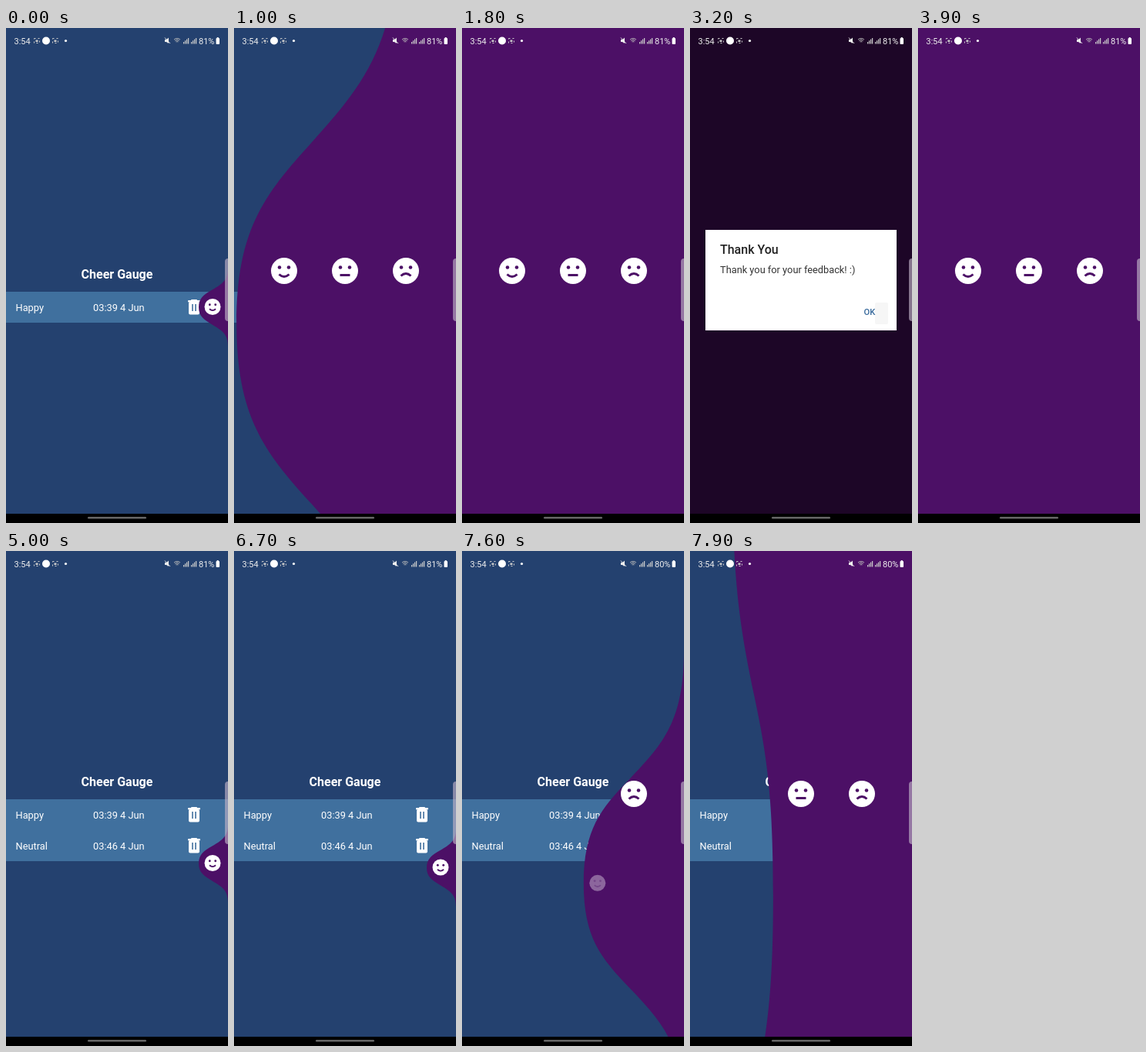
These frames come from a looping animation (288x640 px, 8 s). An HTML page with a canvas:

```html
<!DOCTYPE html>
<html lang="en">
<head>
<meta charset="utf-8">
<style>
  html, body { margin: 0; width: 100%; height: 100%; overflow: hidden; background: #000; }
  canvas { display: block; width: 288px; height: 640px; }
</style>
</head>
<body>
<canvas id="stage" width="288" height="640"></canvas>
<script>
const W = 288, H = 640, LOOP = 8000;
const BLUE = '#24416f', ROW = '#40709e', PURPLE = '#4c1066', WHITE = '#fff';
const ctx = document.getElementById('stage').getContext('2d');

// Piecewise linear value from [time, value] pairs
function track(keys, t) {
  for (let i = 1; i < keys.length; i++) {
    const [t0, a] = keys[i - 1], [t1, b] = keys[i];
    if (t < t1) return a + (b - a) * Math.max(0, (t - t0) / (t1 - t0));
  }
  return keys[keys.length - 1][1];
}

const swipeKeys = [[500, 0], [900, .19], [1200, .685], [1400, 1], [4200, 1], [4500, .86],
  [4900, .21], [5000, 0], [7200, 0], [7600, .19], [7900, .685], [8000, .85]];
const centerKeys = [[0, 361], [500, 361], [1200, 390], [4200, 380], [5000, 404],
  [5300, 409.5], [7200, 409.5], [7900, 445]];
const dialogKeys = [[2350, 0], [2550, 1], [3300, 1], [3500, 0]];
const pressKeys = [[2100, 1], [2200, .3], [2300, .3], [2450, 1]];

function rect(x, y, w, h, color, r = 0) {
  ctx.fillStyle = color;
  ctx.beginPath();
  ctx.roundRect(x, y, w, h, r);
  ctx.fill();
}

function disc(x, y, r, color) {
  ctx.fillStyle = color;
  ctx.beginPath();
  ctx.arc(x, y, r, 0, 7);
  ctx.fill();
}

function text(str, x, y, size, color = WHITE, weight = 400, align = 'left') {
  ctx.font = `${weight} ${size}px Roboto, sans-serif`;
  ctx.textAlign = align;
  ctx.fillStyle = color;
  ctx.fillText(str, x, y);
}

// mood: 1 smiles, 0 is neutral, -1 frowns
function face(x, y, r, mood, alpha = 1) {
  ctx.save();
  ctx.globalAlpha = alpha;
  ctx.translate(x, y);
  ctx.scale(r / 17, r / 17);
  disc(0, 0, 17, WHITE);
  disc(-6, -4.5, 2.3, PURPLE);
  disc(6, -4.5, 2.3, PURPLE);
  ctx.strokeStyle = PURPLE;
  ctx.lineWidth = 3;
  ctx.beginPath();
  const ends = 5.5 - mood;
  ctx.moveTo(-6.5, ends);
  ctx.quadraticCurveTo(0, ends + mood * 6, 6.5, ends);
  ctx.stroke();
  ctx.restore();
}

function trash(y) {
  rect(236, y - 9, 16, 2.5, WHITE, 1);
  rect(240, y - 10, 8, 2, WHITE, 1);
  rect(237, y - 7, 14, 16.5, WHITE, 2);
  rect(241.2, y - 4, 1.6, 9, ROW);
  rect(245.2, y - 4, 1.6, 9, ROW);
}

function listPage(t) {
  rect(0, 0, W, H, BLUE);
  const rows = [['Happy', '03:39 4 Jun'], ['Neutral', '03:46 4 Jun']].slice(0, t < 3000 ? 1 : 2);
  const top = 361 - rows.length * 20;
  text('Cheer Gauge', 144, top - 17, 16, WHITE, 700, 'center');
  rect(0, top, W, rows.length * 40, ROW);
  rows.forEach(([mood, date], i) => {
    const y = top + 20 + i * 40;
    text(mood, 12.5, y + 5, 12.8);
    text(date, 113, y + 5, 12.8);
    trash(y);
  });
}

// Liquid swipe: the side grows while the bulge swells, then swings back past it
function wave(p) {
  const side = W * Math.min(1, Math.max(0, (p - .2) / .6));
  const tall = 50 + (H * .9 - 50) * Math.min(1, p / .4);
  let bulge = 38 + (W * .8 - 38) * p / .4;
  if (p > .4) {
    const s = (p - .4) / .6;
    bulge = p < 1 ? W * .8 * Math.exp(-2.04 * s) * Math.cos(4.675 * s) : 0;
  }
  return { edge: W - side, tall, bulge };
}

function wavePath({ edge, tall, bulge }, cy) {
  const at = (u, v, dir) => [edge - bulge * u, cy + dir * tall * (1 - v)];
  const curve = (dir, ...pts) =>
    ctx.bezierCurveTo(...pts.flatMap(([u, v]) => at(u, v, dir)));
  const start = [0, 0], a = [0, .3], b = [.2, .4], mid = [.54, .552];
  const c = [.83, .68], d = [1, .77], apex = [1, 1];
  ctx.beginPath();
  ctx.moveTo(W + 400, -H);
  ctx.lineTo(edge, -H);
  ctx.lineTo(...at(0, 0, -1));
  curve(-1, a, b, mid);
  curve(-1, c, d, apex);
  curve(1, d, c, mid);
  curve(1, b, a, start);
  ctx.lineTo(edge, 2 * H);
  ctx.lineTo(W + 400, 2 * H);
  ctx.closePath();
}

function moodPage(t) {
  const p = track(swipeKeys, t), cy = track(centerKeys, t), shape = wave(p);
  ctx.save();
  wavePath(shape, cy);
  ctx.fillStyle = PURPLE;
  ctx.fill();
  ctx.clip();
  face(65, 314, 17, 1);
  face(144, 314, 17, 0, track(pressKeys, t));
  face(223, 314, 17, -1);
  ctx.restore();
  if (p < .3) face(shape.edge - shape.bulge + 18, cy - .5, 10.5, 1, 1 - p / .3);
}

function dialog(t) {
  const alpha = track(dialogKeys, t);
  if (!alpha) return;
  ctx.save();
  ctx.globalAlpha = alpha;
  rect(0, 0, W, H, 'rgba(0,0,0,.62)');
  rect(20, 261, 248, 130, WHITE);
  if (t >= 3200) rect(240, 355, 17, 28, '#f6f6f6', 2);
  text('Thank You', 39, 292, 16, '#222', 500);
  text('Thank you for your feedback! :)', 39, 316.5, 12.8, '#333');
  text('OK', 225.5, 370.5, 11.2, '#386a9c', 500);
  ctx.restore();
}

function cropIcon(x) {
  ctx.strokeStyle = '#ccc';
  ctx.lineWidth = 1;
  ctx.setLineDash([2, 3]);
  ctx.strokeRect(x + .5, 13.5, 7, 6);
  ctx.setLineDash([]);
  rect(x + 2.5, 15.5, 3, 2.5, '#ccc');
}

function statusBar(t) {
  text('3:54', 10.5, 20.5, 11, '#eee');
  cropIcon(36);
  disc(52, 16.5, 5, WHITE);
  cropIcon(60);
  disc(77.5, 16.5, 1.6, WHITE);

  // muted speaker
  ctx.fillStyle = ctx.strokeStyle = '#eee';
  ctx.lineWidth = 1;
  ctx.beginPath();
  ctx.moveTo(206, 15); ctx.lineTo(208, 15); ctx.lineTo(211, 12.5);
  ctx.lineTo(211, 20); ctx.lineTo(208, 18); ctx.lineTo(206, 18);
  ctx.fill();
  ctx.beginPath();
  ctx.moveTo(206, 12.5); ctx.lineTo(213, 20);
  ctx.stroke();

  // wifi
  ctx.strokeStyle = '#bbb';
  for (const r of [2, 4, 6]) {
    ctx.beginPath();
    ctx.arc(222, 19.5, r, -2.3, -.85);
    ctx.stroke();
  }
  for (const x of [230, 240])
    for (let i = 0; i < 4; i++) rect(x + i * 2, 18 - i * 1.7, 1.2, 2.5 + i * 1.7, '#ccc');
  text(t < 7000 ? '81%' : '80%', 250, 20.5, 11, '#eee');
  rect(272.5, 13, 4.5, 8, WHITE, 1);
  rect(273.7, 12, 2, 1.5, WHITE);
}

function draw(now) {
  const t = now % LOOP;
  listPage(t);
  moodPage(t);
  dialog(t);
  statusBar(t);
  rect(284, 298, 8, 81, 'rgba(190,176,198,.65)', 4);
  rect(0, 628, W, 12, '#000');
  rect(106, 632, 76, 2.6, '#666', 1.3);
}

const began = performance.now();
function tick() {
  draw(performance.now() - began);
  requestAnimationFrame(tick);
}
tick();
</script>
</body>
</html>
```
